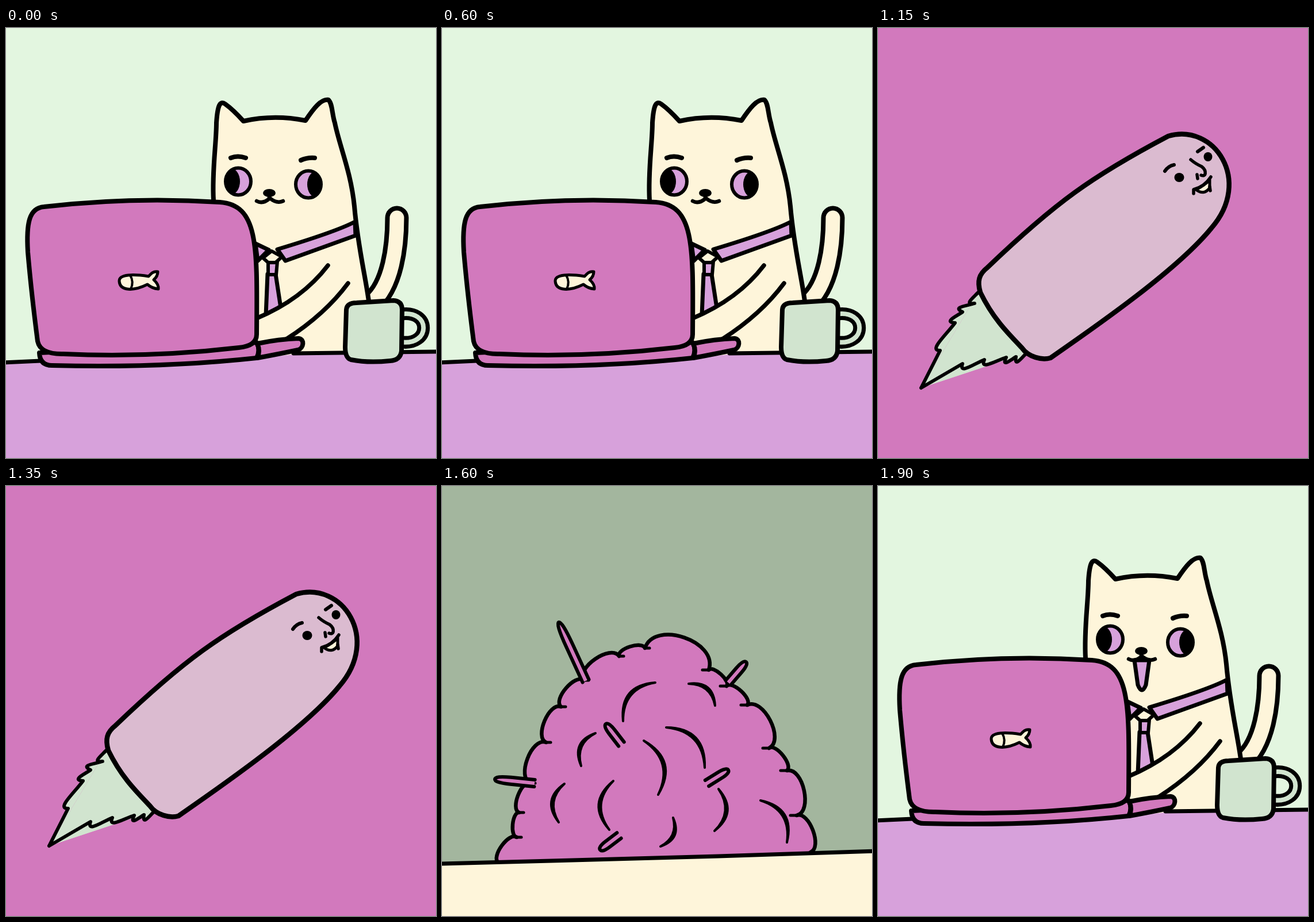
Write an HTML page with a canvas that moves like this. It is 748 px wide and 748 px high and loops after 3900 ms.

```html
<!DOCTYPE html>
<html lang="en">
<head>
<meta charset="utf-8">
<title>Cat at work</title>
<style>
html, body { margin: 0; width: 100%; height: 100%; overflow: hidden; background: #e3f6e0; }
canvas { display: block; width: 100vw; height: 100vh; }
</style>
</head>
<body>
<canvas id="stage" width="748" height="748"></canvas>
<script>
const ctx = document.getElementById('stage').getContext('2d');
const MINT = '#e3f6e0', CREAM = '#fef5da', LILAC = '#d7a1db', PINK = '#d279bd',
  MUG = '#d1e4cf', BODY = '#dbbbd0', SAGE = '#a3b69e', INK = '#000';
ctx.lineCap = ctx.lineJoin = 'round';

function draw(path, fill, width, color = INK) {
  if (typeof path === 'string') path = new Path2D(path);
  if (fill) { ctx.fillStyle = fill; ctx.fill(path); }
  if (width) { ctx.strokeStyle = color; ctx.lineWidth = width; ctx.stroke(path); }
}

function backdrop(color) {
  ctx.fillStyle = color;
  ctx.fillRect(0, 0, 748, 748);
}

function oval(x, y, rx, ry) {
  const path = new Path2D();
  path.ellipse(x, y, rx, ry, 0, 0, Math.PI * 2);
  return path;
}

// Outlined band of even thickness along a centre line.
function tube(path, size, fill, line) {
  draw(path, null, size + line);
  draw(path, null, size - line, fill);
}

function scaled(x, y, k, paint) {
  ctx.save();
  ctx.translate(x, y);
  ctx.scale(k, k);
  ctx.translate(-x, -y);
  paint();
  ctx.restore();
}

// Unit direction a to b, with its left-hand normal.
function frame([ax, ay], [bx, by]) {
  const len = Math.hypot(bx - ax, by - ay);
  const dx = (bx - ax) / len, dy = (by - ay) / len;
  return { len, dx, dy, nx: dy, ny: -dx };
}

function eye(x, y, pupilX) {
  const shape = oval(x, y, 22, 23.5);
  draw(shape, LILAC);
  ctx.save();
  ctx.clip(shape);
  draw(oval(pupilX, y, 16, 23), INK);
  ctx.restore();
  draw(shape, null, 6);
}

function face(drop, open) {
  draw('M391,226Q403,221 417,226M513,230Q524,225 537,226', null, 8);
  eye(404, 267 + drop, 391);
  eye(526, 272 + drop, 540);
  if (open) draw('M446,303L452,346Q459,364 466,346L472,303Z', LILAC, 7);
  draw(oval(458, 287, 11, 7), INK);
  draw('M436,301Q447,307 459,296Q471,306 482,301M458,290V297', null, 6.5);
}

function tie(raised) {
  draw('M607,337Q575,354 472,385L486,405L608,361Z', LILAC, 7);
  draw('M434,375L457,386L438,405Z', LILAC, 7);
  draw(raised ? 'M456,408L452,545H475L478,478L470,408Z' : 'M455,428L452,500H480L469,428Z', LILAC, 7);
  draw('M456,407V429H470L472,406Z', LILAC, 6);
  draw('M462,388L447,400L456,408H469L480,398Z', CREAM, 6);
}

function arm(raised) {
  const [top, low] = raised
    ? ['436,427Q510,422 558,412', '436,474Q540,474 596,447']
    : ['436,505Q515,472 560,413', '488,541Q555,498 595,444'];
  draw(`M${top}L${low}`, null);
  draw(raised ? `M${top}L596,447Q540,474 436,474Z` : `M${top}L595,444Q555,498 488,541H436Z`, CREAM);
  draw(`M${top}M${low}`, null, 7.5);
}

function laptop() {
  draw('M58,565Q59,587 80,587Q270,592 436,574Q443,560 436,547Z', PINK, 8);
  draw('M437,549Q475,541 509,540C520,541 518,557 508,560Q470,568 437,574Q443,562 437,549Z', PINK, 8);
  draw('M38,390C35,340 40,313 66,311Q220,293 372,303C440,308 437,380 436,533Q436,553 405,556Q250,574 100,567Q60,568 55,545Q44,460 38,390Z', PINK, 8);
  draw('M197,440C197,428 222,428 248,432Q256,422 264,424Q264,432 257,438Q266,446 265,454Q254,453 246,446C222,458 198,458 197,440Z', CREAM, 5);
  draw('M216,430Q223,442 217,454', null, 4);
}

function mug() {
  tube('M685,498C740,488 740,555 685,546', 15, MUG, 7);
  draw('M592,490Q593,478 610,478L674,474Q689,475 689,490L688,562Q686,578 668,579Q630,583 600,577Q590,574 590,555Z', MUG, 8);
}

function cat(raised, open) {
  const d = +raised, top = y => y + 5 * d;
  backdrop(MINT);
  tube(raised ? 'M636,478C668,448 686,370 692,331' : 'M636,478C672,448 680,380 680,330', 33, CREAM, 8);
  const outline = `M${361 - 5 * d},300C${358 - 5 * d},250 366,200 366,${top(165)}`
    + `C368,${top(135)} 372,${top(126)} 381,${top(132)}Q395,${top(142)} 413,${top(162)}`
    + `Q466,${top(150)} 521,${top(161)}C535,${top(140)} 548,${top(123)} 561,${top(125)}`
    + `C568,${top(132)} 567,${top(150)} 572,${top(165)}`
    + `C${580 + 14 * d},205 ${600 + 14 * d},250 606,${310 + 8 * d}C612,380 625,430 631,475`;
  draw(outline + 'V570H361Z', CREAM);
  draw(outline, null, 8);
  face(3 * d, open);
  tie(raised);
  arm(raised);
  draw('M0,581L440,574L517,566L748,563V748H0Z', LILAC);
  draw('M-5,582L60,579M500,566L753,563', null, 7);
  laptop();
  mug();
}

// One edge of the flame: hooked teeth between the notches, from hull to tip.
function teeth(path, notches, side) {
  path.moveTo(...notches[0]);
  for (let i = 1; i < notches.length; i++) {
    const a = notches[i - 1], b = notches[i], f = frame(a, b);
    path.bezierCurveTo((a[0] + b[0]) / 2 + side * f.nx * 4, (a[1] + b[1]) / 2 + side * f.ny * 4,
      b[0] + side * f.nx * 18 + f.dx * 10, b[1] + side * f.ny * 18 + f.dy * 10, ...b);
  }
  path.lineTo(75, 626);
}

function flame() {
  const path = new Path2D();
  teeth(path, [[176, 458], [168, 479], [147, 494], [134, 513], [108, 561]], -1);
  teeth(path, [[259, 565], [240, 572], [223, 573], [185, 577], [147, 584]], 1);
  draw('M176,458L75,626L259,565Z', MUG);
  draw(path, MUG, 6);
}

function rocket(flicker) {
  backdrop(PINK);
  scaled(218, 515, flicker ? 0.92 : 1, flame);
  draw('M178,460C172,440 176,428 190,417C308,304 372,258 505,188C585,165 652,265 580,348C520,422 372,524 300,574C285,578 262,573 250,556C225,530 200,505 178,460Z', BODY, 8.5);
  draw('M499,249Q505,240 515,238M556,215L566,208', null, 6);
  draw(oval(524, 260, 8.5, 8), INK);
  draw(oval(574, 224, 7.5, 8), INK);
  draw('M544,229Q552,236 563,241C573,249 570,260 562,256M555,255L556,262', null, 5.5);
  draw('M553,281Q568,274 577,264V278Q567,292 553,281Z', CREAM, 5);
  draw('M549,288V281Q568,276 579,259M577,276L578,283', null, 5.5);
}

// Round lumps between the joints, each joint with a short crease inwards.
const joints = [[98, 655], [130, 611], [134, 568], [154, 517], [181, 446], [207, 384], [247, 338],
  [308, 296], [353, 282], [464, 320], [495, 348], [531, 381], [569, 456], [600, 495], [617, 573], [641, 637]];

// Creases curve to the left of their direction.
const creases = [[315, 409, 371, 342], [429, 344, 475, 382], [390, 420, 457, 490], [351, 443, 376, 537],
  [242, 487, 267, 430], [291, 598, 298, 513], [203, 585, 213, 518], [481, 527, 474, 600],
  [402, 577, 380, 627], [554, 547, 600, 620]];

// Base and tip.
const spikes = [[250, 339, 203, 237], [498, 342, 529, 306], [161, 517, 92, 510],
  [312, 449, 285, 414], [461, 517, 498, 494], [308, 608, 275, 633]];

function heap() {
  const path = new Path2D();
  path.moveTo(...joints[0]);
  for (let i = 1; i < joints.length; i++) {
    const a = joints[i - 1], b = joints[i], f = frame(a, b);
    const h = f.len * (0.18 + f.len * 0.0023);
    path.bezierCurveTo(a[0] + f.nx * h, a[1] + f.ny * h, b[0] + f.nx * h, b[1] + f.ny * h, ...b);
  }
  draw(path, PINK, 6.5);
  for (const [x, y] of joints.slice(1, -1)) draw(`M${x},${y}h${x < 370 ? 8 : -11}`, null, 5);
}

function crease([x0, y0, x1, y1]) {
  const f = frame([x0, y0], [x1, y1]);
  const bow = h => `${(x0 + x1) / 2 + f.nx * h},${(y0 + y1) / 2 + f.ny * h}`;
  const h = f.len * 0.47;
  draw(`M${x0},${y0}Q${bow(h + 4)} ${x1},${y1}Q${bow(h - 4)} ${x0},${y0}Z`, INK, 4);
}

function spike([x, y, tipX, tipY], k) {
  const f = frame([x, y], [tipX, tipY]), l = f.len * k, w = 6;
  ctx.save();
  ctx.translate(x, y);
  ctx.rotate(Math.atan2(f.dy, f.dx));
  draw(`M0,${-w}L${l * 0.6},${-w}Q${l},${-w} ${l},0Q${l},${w} ${l * 0.6},${w}L0,${w}`, PINK, 6);
  ctx.restore();
}

function pile(squeeze) {
  backdrop(SAGE);
  heap();
  creases.forEach(crease);
  spikes.forEach(s => spike(s, squeeze ? 0.9 : 1));
  const ground = 'M-4,657L190,652L480,644L752,635';
  draw(ground + 'V748H-4Z', CREAM);
  draw(ground, null, 7);
}

function render(t) {
  const odd = (from, step) => Math.floor((t - from) / step) % 2 === 1;
  if (t < 1000) cat(odd(0, 100), false);
  else if (t < 1400) rocket(!odd(1000, 50));
  else if (t < 1900) pile(odd(1400, 100));
  else cat(false, true);
}

const start = performance.now();
function tick() {
  render((performance.now() - start) % 3900);
  requestAnimationFrame(tick);
}
tick();
</script>
</body>
</html>
```
